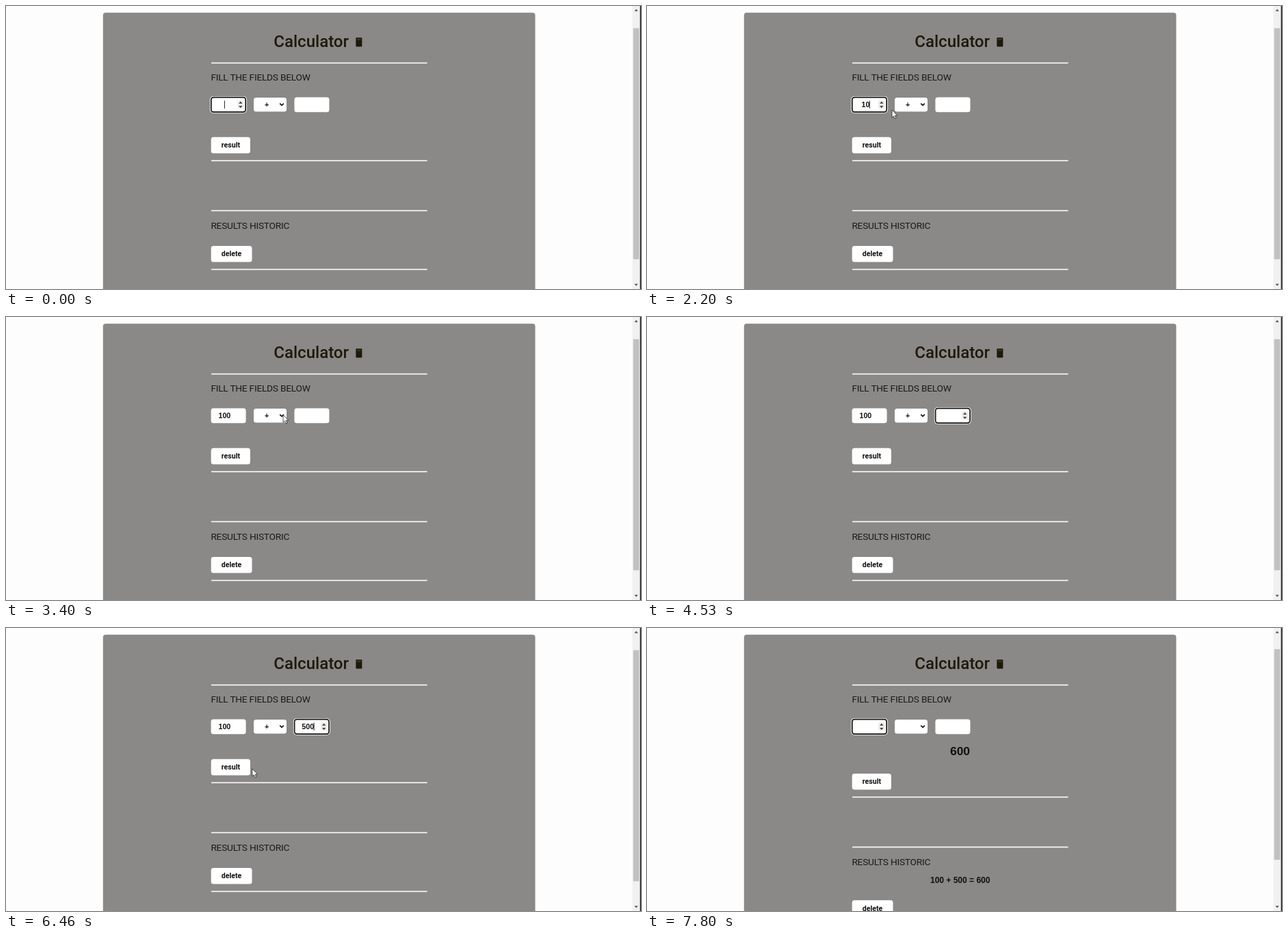
Animation, 928 px wide and 414 px high, one loop 8000 ms. Source, as an HTML page:

```html
<!DOCTYPE html>
<html lang="en">
<head>
<meta charset="utf-8">
<title>Calculator</title>
<style>
  html, body { margin: 0; width: 100%; height: 100%; overflow: hidden; background: #fdfdfd; }
  svg { display: block; width: 100vw; height: 100vh; }
  text { font-family: Roboto, Inter, sans-serif; fill: #1b1919; }
  .title { font-size: 24px; font-weight: 500; fill: #1c1a08; }
  .head { font-size: 13.7px; letter-spacing: -.23px; }
  .label { font-size: 10.6px; font-weight: 600; fill: #111; }
  .num { font-family: "Liberation Sans", Arial, sans-serif; font-weight: 700; font-size: 10.67px; fill: #111; text-anchor: middle; }
  .total { font-size: 17.4px; }
  .past { font-size: 12px; }
  .box { fill: #fff; }
  .rule { fill: #fdfdfd; }
</style>
</head>
<body>
<svg id="stage" viewBox="0 0 928 414" preserveAspectRatio="none"></svg>
<script>
const LOOP = 8000, TICK = 200 / 3;
const CLICK = 6660;

const box = (x, y, w, h, r = 3.5) =>
  `<rect class="box" x="${x}" y="${y}" width="${w}" height="${h}" rx="${r}"/>`;
const rule = y => `<rect class="rule" x="300" y="${y}" width="315.5" height="1.6"/>`;
const button = (y, w, label) =>
  box(299.7, y, w, 23.6) + `<text class="label" x="314.8" y="${y + 15.3}">${label}</text>`;

// A number field with its focus ring, spinner and caret
const field = (id, x) => `
  ${box(x, 133.5, 51, 21.7)}
  <g id="${id}Focus">
    <rect x="${x - 1.5}" y="132.1" width="53.8" height="24.6" rx="5" fill="#fff"/>
    <rect x="${x + .2}" y="133.7" width="50.4" height="21.4" rx="3.5" fill="#fff" stroke="#111" stroke-width="1.7"/>
    <rect x="${x + 38.5}" y="138.3" width="9.4" height="11.8" fill="#ededed"/>
    <path d="M${x + 40.4} 142.8l2.8 -3.2 2.8 3.2zM${x + 40.4} 146l2.8 3.2 2.8 -3.2z" fill="#444"/>
  </g>
  <text id="${id}Text" class="num" x="${x + 19.8}" y="148"></text>
  <rect id="${id}Caret" y="138.5" width="1" height="11.5" fill="#222"/>`;

document.getElementById("stage").innerHTML = `
  <rect width="928" height="414" fill="#fdfdfd"/>
  <rect x="141.8" y="9.7" width="631.6" height="420" rx="4" fill="#8b8888"/>
  <text class="title" x="391.3" y="59.5">Calculator</text>
  <rect x="511.3" y="46.2" width="9" height="13.2" rx=".8" fill="#1c1a08"/>
  <rect x="513" y="47.8" width="5.6" height="2" fill="#3b3826"/>
  ${rule(82.6)}
  <text class="head" x="299.4" y="108.6">FILL THE FIELDS BELOW</text>
  ${field("a", 299.6)}
  ${box(362, 134, 48, 20.6)}
  <text id="op" class="num" x="381" y="147.6">+</text>
  <path d="M400.2 142.6l2.8 2.8 2.8 -2.8" fill="none" stroke="#111" stroke-width="1.6"/>
  ${field("b", 421.4)}
  <text id="total" class="num total" x="457.5" y="186.3">600</text>
  <g id="lower">
    ${button(191.8, 57.2, "result")}
    ${rule(225.5)}
    ${rule(298.6)}
    <text class="head" x="299.4" y="325.5">RESULTS HISTORIC</text>
  </g>
  <text id="past" class="num past" x="457.7" y="372.7">100 + 500 = 600</text>
  <g id="foot">
    ${button(351, 59.8, "delete")}
    ${rule(384.6)}
  </g>
  <rect x="915.5" width="11" height="414" fill="#f1f1f1"/>
  <rect id="thumb" x="916.6" width="8.6" fill="#c1c1c1"/>
  <path d="M918.4 7.4l2.6 -3 2.6 3zM918.4 406.6l2.6 3 2.6 -3z" fill="#505050"/>
  <rect x="926.6" width="1.4" height="414" fill="#161616"/>
  <path id="arrow" d="M0 0V11.2L2.5 8.9 4.3 12.9 6.1 12.1 4.4 8.2H7.8Z" fill="#fff" stroke="#222" stroke-width=".8"/>
  <path id="hand" d="M-1 .8Q0 -.6 1 .8V5L5 6Q6 6.4 5.8 8L5 11V13.4H-.8V11.8L-3.8 8Q-4 6.6 -2.6 7L-1 8.4ZM2.4 5.4V7.4M3.9 5.8V7.6"
    fill="#fff" stroke="#222" stroke-width=".8" stroke-linejoin="round"/>`;

const ui = {};
document.querySelectorAll("#stage [id]").forEach(el => ui[el.id] = el);

const show = (el, on) => el.setAttribute("display", on ? "inline" : "none");
const within = (t, spans) => spans.some(([from, to]) => t >= from && t < to);
const latest = (t, steps) => steps.reduce((v, [at, value]) => t >= at ? value : v, "");

const typed = {
  a: [[1400, "1"], [1930, "10"], [2400, "100"], [CLICK, ""]],
  b: [[5130, "5"], [5730, "50"], [6000, "500"], [CLICK, ""]]
};
const focus = {
  a: [[0, 3060], [7400, LOOP]],
  b: [[4130, CLICK]]
};
const caret = {
  a: [[0, 130], [660, 1000], [1400, 1860], [1930, 2930], [7400, 7800]],
  b: [[4130, 4530], [5060, 5660], [5730, 6530]]
};

// Pointer trips between fields: time, x, y. Over a field it is invisible.
const trips = [
  [[2200, 358, 152], [2600, 377, 152], [3000, 398, 144], [3333, 398, 144],
   [3400, 405, 143], [3600, 411, 143], [3866, 421, 143]],
  [[6200, 428, 157], [6333, 392, 185], [6460, 361, 206], [6600, 337, 203],
   [6733, 336, 203], [7000, 337, 184], [7266, 331, 157]]
];

function pointer(t) {
  const trip = trips.find(p => t >= p[0][0] && t < p[p.length - 1][0]);
  if (!trip) return null;
  const i = trip.findIndex(p => p[0] > t);
  const [t0, x0, y0] = trip[i - 1], [t1, x1, y1] = trip[i];
  const k = (t - t0) / (t1 - t0);
  return [x0 + (x1 - x0) * k, y0 + (y1 - y0) * k];
}

function draw(t) {
  for (const id of ["a", "b"]) {
    const value = latest(t, typed[id]);
    const text = ui[id + "Text"];
    text.textContent = value;
    show(ui[id + "Focus"], within(t, focus[id]));
    show(ui[id + "Caret"], within(t, caret[id]));
    ui[id + "Caret"].setAttribute("x", +text.getAttribute("x") - .5 + value.length * 2.97);
  }

  const done = t >= CLICK;
  show(ui.op, !done);
  show(ui.total, done);
  show(ui.past, done);
  ui.lower.setAttribute("transform", `translate(0 ${done ? 21.1 : 0})`);
  ui.foot.setAttribute("transform", `translate(0 ${done ? 47.3 : 0})`);
  ui.thumb.setAttribute("y", done ? 31 : 32.5);
  ui.thumb.setAttribute("height", done ? 308 : 338);

  // The pointer is sampled at 15 steps per second
  const at = pointer(Math.floor((t + 7) / TICK) * TICK + .5);
  const overButton = t >= 6525 && t < 6795;
  show(ui.arrow, at && !overButton);
  show(ui.hand, at && overButton);
  if (at) {
    const move = `translate(${at[0].toFixed(1)} ${at[1].toFixed(1)})`;
    ui.arrow.setAttribute("transform", move);
    ui.hand.setAttribute("transform", move);
  }
}

const start = performance.now();
function frame() {
  draw((performance.now() - start) % LOOP);
  requestAnimationFrame(frame);
}
frame();
</script>
</body>
</html>
```
